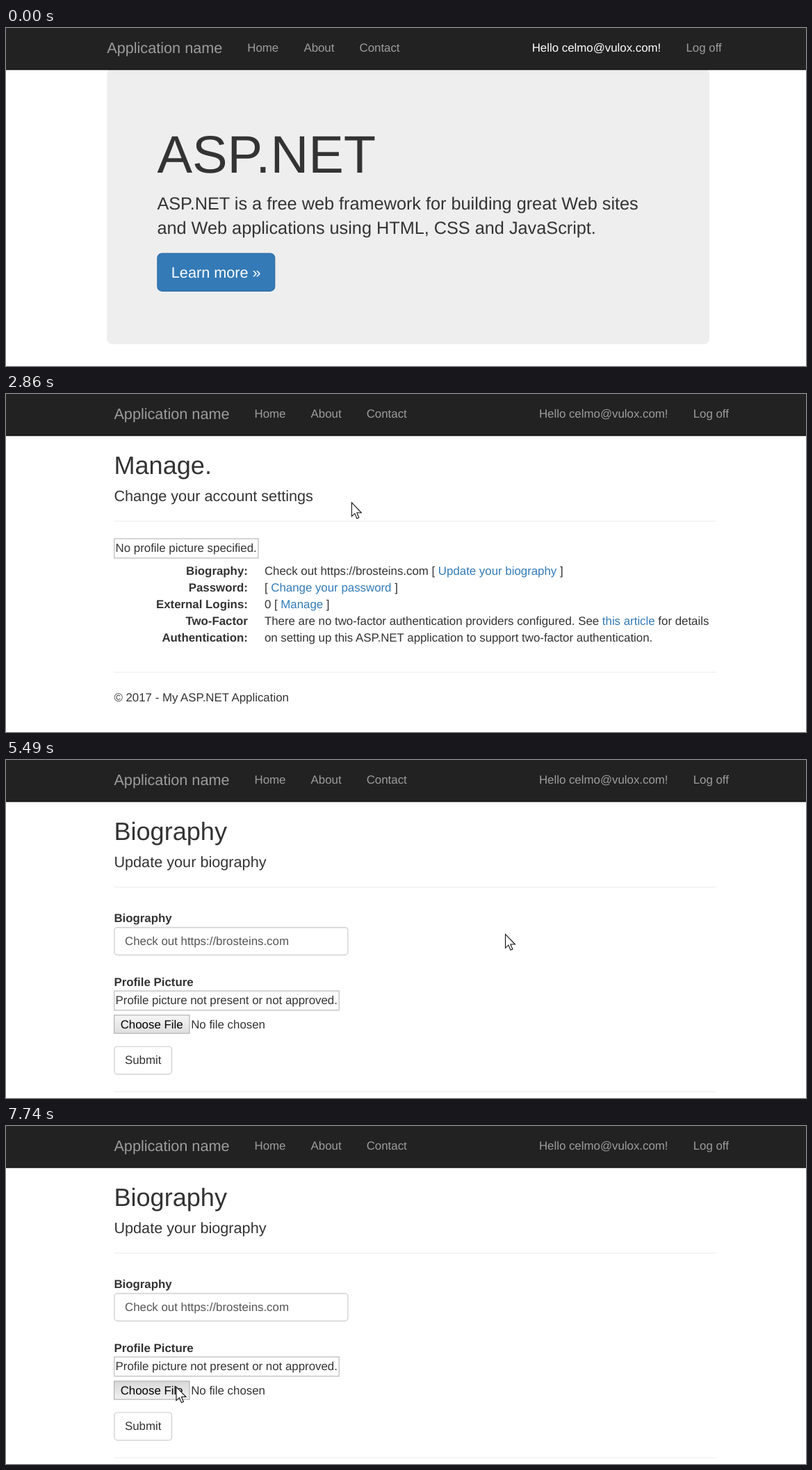
Recreate the animation shown at these times as an HTML page. Size 1151x486 px, loop 7990 ms.

```html
<!DOCTYPE html>
<html lang="en">
<head>
<meta charset="utf-8">
<title>Account settings walkthrough</title>
<style>
  html, body { margin: 0; width: 100%; height: 100%; overflow: hidden; background: #fff; }
  svg { display: block; width: 100%; height: 100%; }
  text { font: 16.855px "Liberation Sans", Arial, sans-serif; fill: #333; text-rendering: geometricPrecision; }
  .nav text { fill: #9d9d9d; }
  .nav .hover { fill: #fff; }
  text.h1 { font-size: 75.85px; }
  text.h2 { font-size: 36.12px; }
  text.h4 { font-size: 21.67px; }
  text.lead { font-size: 25.28px; }
  text.bold { font-weight: bold; }
  text.term { font-weight: bold; text-anchor: end; }
  .link { fill: #337ab7; }
  .link.hover { fill: #23527c; text-decoration: underline; }
  .rule { fill: #eee; }
  .frame { fill: none; stroke: #c0c0c0; stroke-width: 1.3; }
  .control { fill: #fff; stroke: #ccc; stroke-width: 1.2; }
  .page { display: none; }
  .page.on { display: inline; }
</style>
</head>
<body>
<svg viewBox="0 0 1151 486">
  <defs>
    <linearGradient id="raised" x2="0" y2="1">
      <stop stop-color="#f6f6f6"/><stop offset="1" stop-color="#dedede"/>
    </linearGradient>
    <linearGradient id="pressed" x2="0" y2="1">
      <stop stop-color="#d8d8d8"/><stop offset="1" stop-color="#f2f2f2"/>
    </linearGradient>
  </defs>

  <g class="page">
    <rect x="145.2" y="58.6" width="866.8" height="396" rx="7.2" fill="#eee"/>
    <text class="h1" x="217.4" y="207.5">ASP.NET</text>
    <text class="lead" x="217.4" y="261">ASP.NET is a free web framework for building great Web sites</text>
    <text class="lead" x="217.4" y="296.4">and Web applications using HTML, CSS and JavaScript.</text>
    <rect x="217.9" y="324.1" width="168.8" height="54.2" rx="6.6" fill="#337ab7" stroke="#2e6da4" stroke-width="1.2"/>
    <text class="h4" x="237.8" y="358.5" style="fill:#fff">Learn more »</text>
  </g>

  <g class="page">
    <text class="h2" x="155.4" y="115.1">Manage.</text>
    <text class="h4" x="155.4" y="153.6">Change your account settings</text>
    <rect class="rule" x="155.4" y="182.2" width="866.8" height="1.2"/>
    <rect class="frame" x="155.8" y="208.1" width="207.2" height="27.8"/>
    <text x="157.6" y="227.2">No profile picture specified.</text>

    <text class="term" x="347.9" y="260.1">Biography:</text>
    <text class="term" x="347.9" y="284.2">Password:</text>
    <text class="term" x="347.9" y="308.3">External Logins:</text>
    <text class="term" x="347.9" y="332.3">Two-Factor</text>
    <text class="term" x="347.9" y="356.4">Authentication:</text>

    <text x="371.9" y="260.1">Check out https://brosteins.com [ <tspan class="link" id="update">Update your biography</tspan> ]</text>
    <text x="371.9" y="284.2">[ <tspan class="link">Change your password</tspan> ]</text>
    <text x="371.9" y="308.3">0 [ <tspan class="link">Manage</tspan> ]</text>
    <text x="371.9" y="332.3">There are no two-factor authentication providers configured. See <tspan class="link">this article</tspan> for details</text>
    <text x="371.9" y="356.4">on setting up this ASP.NET application to support two-factor authentication.</text>

    <rect class="rule" x="155.4" y="399.4" width="866.8" height="1.2"/>
    <text x="155.4" y="441.9">© 2017 - My ASP.NET Application</text>
  </g>

  <g class="page">
    <text class="h2" x="155.4" y="115.1">Biography</text>
    <text class="h4" x="155.4" y="153.6">Update your biography</text>
    <rect class="rule" x="155.4" y="182.2" width="866.8" height="1.2"/>

    <text class="bold" x="155.4" y="233.3">Biography</text>
    <rect class="control" x="155.9" y="240.6" width="336" height="39.8" rx="4.4"/>
    <rect class="rule" x="158" y="241.2" width="332" height="1.2"/>
    <text x="171" y="265.8" style="fill:#555">Check out https://brosteins.com</text>

    <text class="bold" x="155.4" y="324.7">Profile Picture</text>
    <rect class="frame" x="155.8" y="332.1" width="323.4" height="27.6"/>
    <text x="157.6" y="351.2">Profile picture not present or not approved.</text>
    <rect id="choose" x="155.6" y="366.9" width="108.4" height="26.2" stroke="#b2b2b2" stroke-width="1.2"/>
    <text x="164.7" y="385.6" style="fill:#000">Choose File</text>
    <text x="266.2" y="385.6">No file chosen</text>

    <rect class="control" x="155.9" y="412" width="82.6" height="39.8" rx="4.4"/>
    <text x="171" y="437.2">Submit</text>
    <rect class="rule" x="155.4" y="476.4" width="866.8" height="1.2"/>
  </g>

  <rect width="1151" height="60.4" fill="#080808"/>
  <rect width="1151" height="59.2" fill="#222"/>
  <g class="nav" id="nav">
    <text class="h4" x="145.2" y="35.9">Application name</text>
    <text x="347.3" y="34.4">Home</text>
    <text x="428.4" y="34.4">About</text>
    <text x="508.5" y="34.4">Contact</text>
    <text id="hello" x="756.7" y="34.4">Hello celmo@vulox.com!</text>
    <text x="978.5" y="34.4">Log off</text>
  </g>

  <path id="cursor" d="M0 0V19.8L4.4 15.7 7.5 22.8 10.4 21.5 7.4 14.5H13.9Z" fill="#fff" stroke="#111" stroke-width="1.1"/>
</svg>
<script>
  const LOOP = 7990;
  const PAGE_STARTS = [0, 1700, 5490];
  const CURSOR_SHOWN = 460;
  const PRESSED = 7665;

  // [time, x, y, equal hops taken since the previous stop]
  const STOPS = [
    [460, 882, 7, 1], [615, 859, 27, 2], [770, 864, 25, 2], [1080, 866, 23.5, 1],
    [2000, 859, 26.5, 1],
    [2230, 863, 24, 1], [2620, 600, 110, 5], [3010, 429, 187, 5],
    [3090, 420, 194, 1], [3400, 364, 213, 4], [3790, 365.5, 213.5, 1],
    [3940, 400, 212, 1], [4018, 466, 207, 1], [4290, 585, 178, 3], [4720, 713, 253, 6],
    [4810, 711, 254, 1], [4870, 711, 254.5, 1], [5100, 718.5, 250.5, 1],
    [6180, 708.3, 251.3, 1], [6500, 440, 395, 4], [6660, 310, 439, 2], [6900, 251, 374, 3],
    [7590, 249, 374, 1], [7665, 246, 375, 1], [7740, 245, 375, 1]
  ];

  const byId = id => document.getElementById(id);
  const pages = document.querySelectorAll(".page");
  const [nav, hello, update, choose, cursor] = ["nav", "hello", "update", "choose", "cursor"].map(byId);

  function cursorAt(t) {
    const next = STOPS.findIndex(stop => stop[0] > t);
    if (next === 0) return STOPS[0].slice(1, 3);
    if (next < 0) return STOPS[STOPS.length - 1].slice(1, 3);
    const [t0, x0, y0] = STOPS[next - 1];
    const [t1, x1, y1, hops] = STOPS[next];
    const part = Math.floor((t - t0) / (t1 - t0) * hops) / hops;
    return [x0 + (x1 - x0) * part, y0 + (y1 - y0) * part];
  }

  function draw(t) {
    const page = PAGE_STARTS.filter(start => start <= t).length - 1;
    pages.forEach((el, i) => el.classList.toggle("on", i === page));
    nav.setAttribute("transform", `translate(${page ? 10.2 : 0})`);
    hello.classList.toggle("hover", page === 0);

    const [x, y] = cursorAt(t);
    cursor.setAttribute("transform", `translate(${x} ${y})`);
    cursor.style.visibility = t < CURSOR_SHOWN ? "hidden" : "visible";
    update.classList.toggle("hover", x > 622 && x < 793 && y > 245 && y < 265);
    choose.setAttribute("fill", `url(#${t < PRESSED ? "raised" : "pressed"})`);
  }

  const begin = performance.now();
  function tick() {
    draw((performance.now() - begin) % LOOP);
    requestAnimationFrame(tick);
  }
  tick();
</script>
</body>
</html>
```
